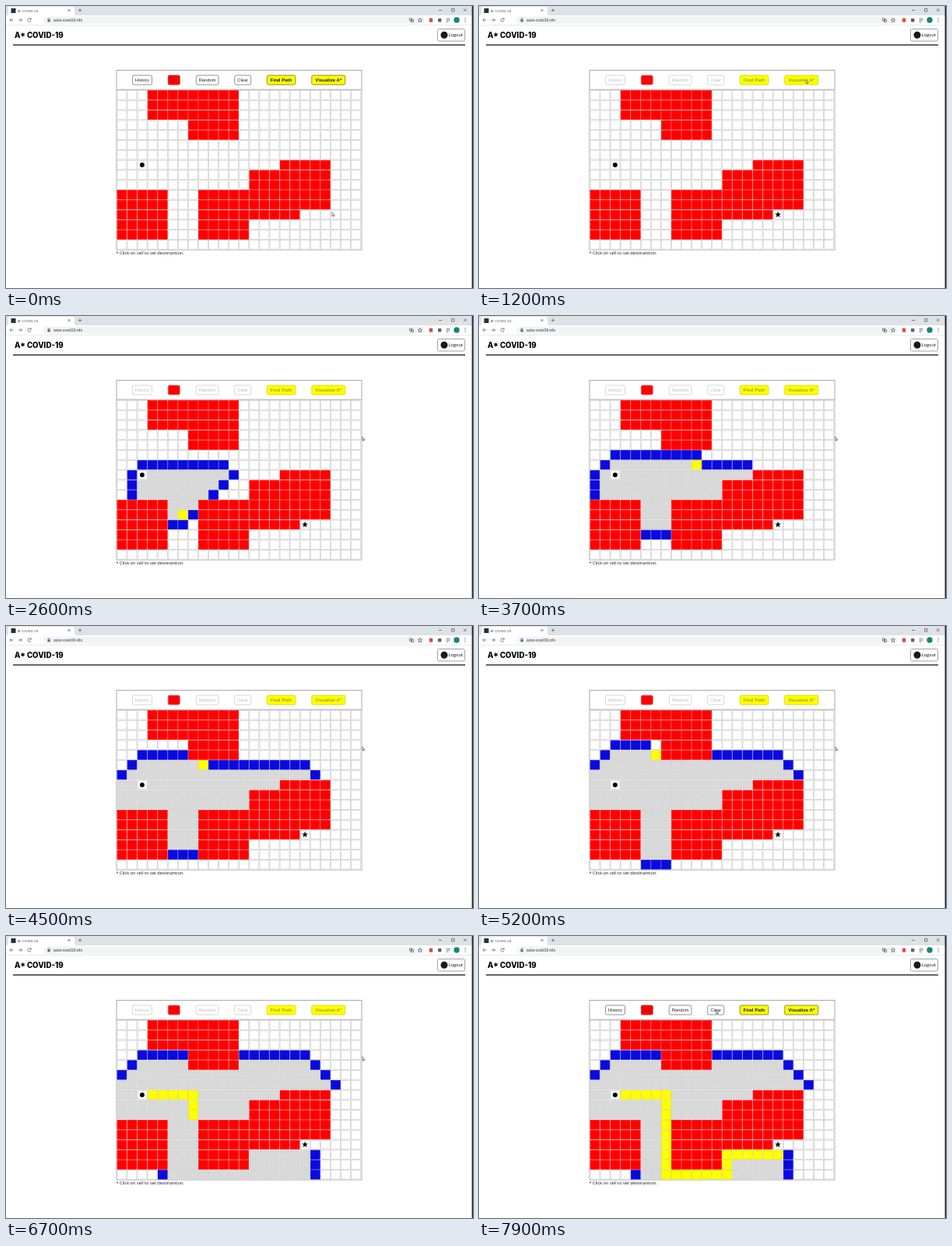
An HTML page that plays this animation: 600x362 px, repeating every 8000 ms.

```html
<!DOCTYPE html>
<html lang="en">
<head>
<meta charset="utf-8">
<title>A* COVID-19</title>
<style>
  html, body { margin: 0; width: 100%; height: 100%; overflow: hidden; background: #fff; }
  svg { display: block; width: 100vw; height: 100vh; font-family: "Liberation Sans", Arial, sans-serif; }
  .ui { font-family: "Open Sans", "Noto Sans", sans-serif; }
  .title { font: 800 9.7px Inter, sans-serif; }
  .icon { fill: none; stroke: #5f6368; stroke-width: .8; }
</style>
</head>
<body>
<svg id="stage" viewBox="0 0 600 362">
  <rect width="600" height="362" fill="#fff"/>
  <g id="browser">
    <rect width="600" height="12" fill="#dee1e6"/>
    <path d="M1 12Q3 12 3 9V3Q3 1 5 1H86Q88 1 88 3V9Q88 12 90 12Z" fill="#fff"/>
    <rect x="6.500" y="3" width="6" height="6" fill="#20332f"/>
    <text x="15" y="7.600" font-size="4.400" fill="#444">A* COVID-19</text>
    <path class="icon" d="M79.500 4l3 3m0-3l-3 3M93 5.500h4m-2-2v4"/>
    <path class="icon" d="M556 5.500h4M572.500 3.500h3.500v3.500h-3.500zM588 3.500l3.500 3.500m0-3.500l-3.500 3.500" stroke="#222"/>
    <path d="M0 24.500H600" stroke="#e3e4e6" stroke-width=".8"/>
    <rect x="48" y="13.500" width="490" height="9.500" rx="4.700" fill="#f1f3f4"/>
    <path class="icon" d="M9.500 18H5m2-2l-2 2 2 2"/>
    <path class="icon" d="M16 18h4.500m-2-2l2 2-2 2" stroke="#b5b8bc"/>
    <path class="icon" d="M32 16.800a2.200 2.200 0 1 0 .2 2M32.300 15.500v1.700h-1.700"/>
    <path class="icon" d="M54 18v-1a1.100 1.100 0 0 1 2.200 0v1"/>
    <rect x="53.500" y="17.700" width="3.200" height="2.600" fill="#5f6368"/>
    <text x="61" y="19.800" font-size="4.700" fill="#333">astar-covid19.info</text>
    <path class="icon" d="M518.500 16h3v3h-3zM520.500 17.500h3v3h-3z"/>
    <path class="icon" d="M532 15.500l.8 1.700 1.900.2-1.400 1.300.4 1.800-1.700-.9-1.700.9.4-1.800-1.400-1.300 1.900-.2z" stroke-width=".6"/>
    <rect x="543.800" y="15.700" width="4.400" height="5" fill="#dd4b3e"/>
    <rect x="555" y="16" width="4.400" height="4.400" rx=".8" fill="#5f6368"/>
    <path class="icon" d="M565.500 16.300h5M565.500 18.300h5M565.500 20.300h3"/>
    <circle cx="579" cy="18" r="3.700" fill="#16857a"/>
    <path d="M590 15.300v6" stroke="#5f6368" stroke-width="1.100" stroke-dasharray="1.100 1.100"/>
  </g>
  <text class="title" x="11" y="41">A* COVID-19</text>
  <path d="M9 50H590" stroke="#333" stroke-width="1.300"/>
  <rect x="554.500" y="29.500" width="35" height="15.500" rx="2" fill="#fff" stroke="#999" stroke-width=".9"/>
  <circle cx="563" cy="37.200" r="4.500" fill="#191717"/>
  <text class="ui" x="568.500" y="39.300" font-size="5.700">Logout</text>
  <path d="M599.300 0V362" stroke="#222" stroke-width="1.400"/>
  <rect x="142" y="82.500" width="315" height="230.500" fill="#fff" stroke="#a8a8a8"/>
  <rect x="142.500" y="107.300" width="314" height="205.200" fill="#f4f4f4"/>
  <path d="M142 107.200H457" stroke="#a8a8a8" stroke-width=".9"/>
  <g id="buttons"></g>
  <g id="grid"></g>
  <circle cx="174.900" cy="203.900" r="3" fill="#000"/>
  <path id="goal" fill="#000"/>
  <text class="ui" x="141.500" y="319.400" font-size="5.650" fill="#111">* Click on cell to set destinantion.</text>
  <path id="cursor" d="M0 0V4.800L1.100 3.800 1.800 5.400 2.500 5.100 1.800 3.500H3.300Z" fill="#fff" stroke="#222" stroke-width=".5"/>
</svg>
<script>
const NS = 'http://www.w3.org/2000/svg';
const $ = id => document.getElementById(id);
const COLS = 24, ROWS = 16, CELL_W = 13.07, CELL_H = 12.8;
const LOOP = 8000, FRAME = 100;
const COLORS = { empty: '#fff', wall: '#f00', open: '#0a0adf', closed: '#d9d9d9', current: '#ff0', path: '#ff0' };
const BORDERS = { empty: '#cfcfcf', closed: '#cdcdcd', current: '#e6e600', path: '#e3e300' };

function add(parent, tag, attrs, text) {
  const el = document.createElementNS(NS, tag);
  for (const key in attrs) el.setAttribute(key, attrs[key]);
  if (text) el.textContent = text;
  parent.append(el);
  return el;
}

// Walls as inclusive rectangles: left, top, right, bottom
const wallBlocks = [
  [3, 0, 11, 2], [7, 3, 11, 4], [16, 7, 20, 7], [13, 8, 20, 9],
  [8, 10, 20, 11], [8, 12, 17, 12], [8, 13, 12, 14], [0, 10, 4, 14]
];
const isWall = (c, r) => wallBlocks.some(([l, t, rt, b]) => c >= l && c <= rt && r >= t && r <= b);
const index = (c, r) => r * COLS + c;
const start = [2, 7], goal = [18, 12];
const startId = index(...start), goalId = index(...goal);

// A* with Manhattan distance; equal scores leave the queue in insertion order
function search() {
  const score = (c, r, g) => g + Math.abs(goal[0] - c) + Math.abs(goal[1] - r);
  const first = { c: start[0], r: start[1], g: 0, f: score(...start, 0), parent: null };
  const queue = [first], seen = new Set([startId]), events = [];
  while (queue.length) {
    let best = 0;
    queue.forEach((node, i) => { if (node.f < queue[best].f) best = i; });
    const node = queue.splice(best, 1)[0];
    if (index(node.c, node.r) === goalId) {
      const path = [];
      for (let n = node.parent; n.parent; n = n.parent) path.unshift(index(n.c, n.r));
      return { events, path };
    }
    events.push(['current', index(node.c, node.r)]);
    for (const [dc, dr] of [[0, -1], [1, 0], [0, 1], [-1, 0]]) {
      const c = node.c + dc, r = node.r + dr, id = index(c, r);
      if (c < 0 || r < 0 || c >= COLS || r >= ROWS || isWall(c, r) || seen.has(id)) continue;
      seen.add(id);
      events.push(['open', id]);
      queue.push({ c, r, g: node.g + 1, f: score(c, r, node.g + 1), parent: node });
    }
  }
}
const { events, path } = search();

const cells = [];
for (let r = 0; r < ROWS; r++) {
  for (let c = 0; c < COLS; c++) {
    cells.push(add($('grid'), 'rect', {
      x: 143 + c * CELL_W, y: 108.6 + r * CELL_H, width: 11.9, height: 11.5, 'stroke-width': 0.7
    }));
  }
}
const base = cells.map((_, i) => isWall(i % COLS, Math.floor(i / COLS)) ? 'wall' : 'empty');

const starPoints = Array.from({ length: 10 }, (_, i) => {
  const radius = i % 2 ? 1.7 : 4.2, a = i * Math.PI / 5;
  return `${384.1 + radius * Math.sin(a)} ${267.8 - radius * Math.cos(a)}`;
});
$('goal').setAttribute('d', `M${starPoints.join('L')}Z`);

const buttons = [
  ['History', 162.5, 25], ['On', 208.3, 15, '#f00'], ['Random', 244.3, 28.7], ['Clear', 293.7, 21],
  ['Find Path', 335.3, 36.5, '#ff0'], ['Visualize A*', 392.8, 43, '#ff0']
].map(([label, x, width, fill = '#fff']) => {
  const strong = fill === '#ff0';
  return {
    fill,
    box: add($('buttons'), 'rect', { x, y: 89, width, height: 12, rx: 1.7, fill, 'stroke-width': 0.8 }),
    text: add($('buttons'), 'text', {
      x: x + width / 2, y: strong ? 96.9 : 97, 'text-anchor': 'middle',
      'font-size': strong ? 6.05 : 5.8, 'font-weight': strong ? 700 : 400
    }, label)
  };
});
const buttonStyles = {
  '#fff': { on: ['#777', '#222'], off: ['#ccc', '#bbb'] },
  '#f00': { on: ['#a33', '#8c0000'], off: ['#d66', '#f00'] },
  '#ff0': { on: ['#777700', '#111'], off: ['#d4d400', '#a3a300'] }
};

// Linear interpolation through [time, ...values] keys
function track(keys, t) {
  if (t <= keys[0][0]) return keys[0].slice(1);
  const i = keys.findIndex(key => key[0] > t);
  if (i < 0) return keys[keys.length - 1].slice(1);
  const a = keys[i - 1], b = keys[i], k = (t - a[0]) / (b[0] - a[0]);
  return a.slice(1).map((v, j) => v + (b[j + 1] - v) * k);
}
const pointer = [
  [0, 419, 265], [300, 383, 266], [500, 383, 266], [1000, 420, 94.5], [1300, 420, 94.5],
  [1700, 457.7, 155], [7250, 457.7, 155], [7750, 304.5, 95]
];
const progress = [[1210, 0], [2600, 75.5], [3700, 134.5], [5200, 217.5], [6100, 268.5], [6520, 292]];
const STAR_AT = 500, BUSY_FROM = 1100, PATH_FROM = 6550, PATH_STEP = 24;
const BUSY_TO = PATH_FROM + path.length * PATH_STEP;

function render(t) {
  const state = base.slice();
  let current = -1;
  for (const [kind, id] of events.slice(0, Math.floor(track(progress, t)[0]))) {
    if (kind === 'current') {
      if (current >= 0) state[current] = 'closed';
      current = id;
    }
    state[id] = kind;
  }
  if (t >= PATH_FROM) {
    state[current] = 'closed';
    path.slice(0, Math.floor((t - PATH_FROM) / PATH_STEP) + 1).forEach(id => { state[id] = 'path'; });
  }
  state[startId] = state[goalId] = 'empty';
  cells.forEach((cell, i) => {
    cell.setAttribute('fill', COLORS[state[i]]);
    cell.setAttribute('stroke', BORDERS[state[i]] || COLORS[state[i]]);
  });

  const mode = t >= BUSY_FROM && t < BUSY_TO ? 'off' : 'on';
  for (const { fill, box, text } of buttons) {
    const [border, ink] = buttonStyles[fill][mode];
    box.setAttribute('stroke', border);
    text.setAttribute('fill', ink);
  }
  $('goal').setAttribute('visibility', t >= STAR_AT ? 'visible' : 'hidden');
  $('cursor').setAttribute('transform', `translate(${track(pointer, t).join(' ')})`);
}

const origin = performance.now();
function tick() {
  const t = (performance.now() - origin) % LOOP;
  render(Math.floor(t / FRAME) * FRAME);
  requestAnimationFrame(tick);
}
tick();
</script>
</body>
</html>
```
